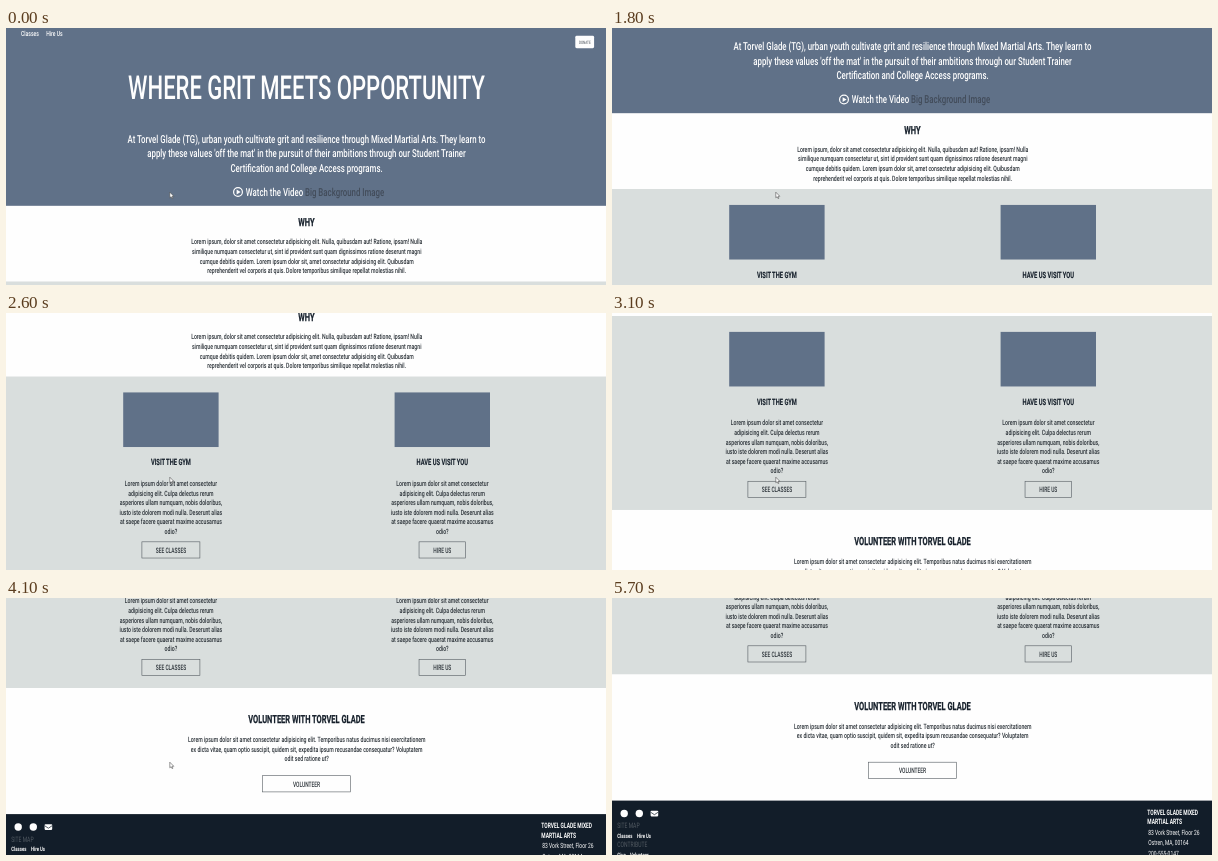
Animation of 600x257 px, one loop 6.1 s. Source, as an HTML page:

```html
<!DOCTYPE html>
<html lang="en">
<head>
<meta charset="utf-8">
<title>Landing page scroll</title>
<style>
html, body { margin: 0; width: 100%; height: 100%; overflow: hidden; background: #fdfdfd; }
svg { display: block; width: 100vw; height: 100vh; }
text { font-family: Roboto, "Liberation Sans", sans-serif; text-rendering: geometricPrecision; white-space: pre; }
</style>
</head>
<body>
<svg id="stage" viewBox="0 0 600 257">
  <g id="page"></g>
  <path id="cursor" d="M0 0V5.6L1.3 4.5L2.2 6.4L3.1 6L2.3 4.1H4Z" fill="#fff" stroke="#444" stroke-width=".55"/>
</svg>
<script>
const NS = "http://www.w3.org/2000/svg";
const page = document.getElementById("page");
const cursor = document.getElementById("cursor");

const BLUE = "#607188", GREY = "#d9dedd", WHITE = "#fefefe", NAVY = "#121d29";
const INK = "#2b3238", DARK = "#151f2a", MUTED = "#535b63";

// Type styles: size, weight, condensing of the face, extra stroke
const STYLES = {
  title: [33, 500, .668],
  hero: [11.05, 500, .71],
  h2: [11.2, 700, .668, .25],
  h3: [8.7, 700, .66, .15],
  body: [7.35, 500, .702],
  button: [7.5, 500, .65],
  nav: [7.1, 500, .71],
  donate: [4.6, 500, .66],
  links: [6, 700, .71],
  label: [7.5, 400, .67],
  org: [7.5, 700, .655],
  address: [7.2, 400, .685]
};

function add(tag, attrs) {
  const el = document.createElementNS(NS, tag);
  for (const key in attrs) el.setAttribute(key, attrs[key]);
  page.appendChild(el);
  return el;
}

function rect(x, y, width, height, fill, extra) {
  add("rect", { x, y, width, height, fill, ...extra });
}

function text(str, x, y, style, fill = INK, anchor = "middle") {
  const [size, weight, narrow, stroke = 0] = STYLES[style];
  add("text", {
    transform: `translate(${x} ${y}) scale(${narrow} 1)`,
    "font-size": size, "font-weight": weight, "text-anchor": anchor,
    fill, stroke: fill, "stroke-width": stroke
  }).textContent = str;
}

const left = (str, x, y, style, fill) => text(str, x, y, style, fill, "start");

function lines(list, x, y, step, style, fill) {
  list.forEach((str, i) => text(str, x, y + i * step, style, fill));
}

function button(label, x, y, w, h) {
  rect(x, y, w, h, "none", { stroke: "#555c62", "stroke-width": .6 });
  text(label, x + w / 2, y + h / 2 + 2.7, "button");
}

function hero() {
  rect(0, 0, 600, 177.9, BLUE);
  left("Classes", 15, 8, "nav", WHITE);
  left("Hire Us", 40.2, 8, "nav", WHITE);
  rect(569.3, 7.8, 18.8, 12.4, WHITE, { rx: 1.4 });
  text("DONATE", 578.8, 15.7, "donate", "#6b7178");
  text("WHERE GRIT MEETS OPPORTUNITY", 300.5, 71.3, "title", WHITE);
  lines([
    "At Torvel Glade (TG), urban youth cultivate grit and resilience through Mixed Martial Arts. They learn to",
    "apply these values 'off the mat' in the pursuit of their ambitions through our Student Trainer",
    "Certification and College Access programs."
  ], 300.5, 114.9, 14.4, "hero", WHITE);
  add("circle", { cx: 232, cy: 164, r: 4.4, fill: "none", stroke: WHITE, "stroke-width": 1.2 });
  add("path", { d: "M230.6 161.6L234.6 164L230.6 166.4Z", fill: WHITE });
  left("Watch the Video", 239.8, 167.6, "hero", WHITE);
  left("Big Background Image", 299, 167.6, "hero", "#424c5a");
}

function why() {
  rect(0, 177.9, 600, 75.6, WHITE);
  text("WHY", 300.5, 198.4, "h2", DARK);
  lines([
    "Lorem ipsum, dolor sit amet consectetur adipisicing elit. Nulla, quibusdam aut! Ratione, ipsam! Nulla",
    "similique numquam consectetur ut, sint id provident sunt quam dignissimos ratione deserunt magni",
    "cumque debitis quidem. Lorem ipsum dolor sit, amet consectetur adipisicing elit. Quibusdam",
    "reprehenderit vel corporis at quis. Dolore temporibus similique repellat molestias nihil."
  ], 300.7, 216.3, 9.62, "body");
}

function card(x, heading, label, w) {
  rect(x - 47.7, 269.4, 95.4, 54.6, BLUE);
  text(heading, x, 342.4, "h3", DARK);
  lines([
    "Lorem ipsum dolor sit amet consectetur",
    "adipisicing elit. Culpa delectus rerum",
    "asperiores ullam numquam, nobis doloribus,",
    "iusto iste dolorem modi nulla. Deserunt alias",
    "at saepe facere quaerat maxime accusamus",
    "odio?"
  ], x, 362.9, 9.6, "body");
  button(label, x - w / 2, 418.8, w, 16.2);
}

function volunteer() {
  rect(0, 447.5, 600, 126.1, WHITE);
  text("VOLUNTEER WITH TORVEL GLADE", 300.5, 482.9, "h2", DARK);
  lines([
    "Lorem ipsum dolor sit amet consectetur adipisicing elit. Temporibus natus ducimus nisi exercitationem",
    "ex dicta vitae, quam optio suscipit, quidem sit, expedita ipsum recusandae consequatur? Voluptatem",
    "odit sed ratione ut?"
  ], 300.7, 501.6, 9.6, "body");
  button("VOLUNTEER", 256.5, 535.2, 88, 16.2);
}

function footer() {
  rect(0, 573.6, 600, 60, NAVY);
  for (const cx of [12.2, 27.3]) add("circle", { cx, cy: 586.5, r: 3.7, fill: WHITE });
  rect(38.6, 583.7, 7.6, 5.7, WHITE, { rx: .8 });
  add("path", { d: "M38.6 585.2L42.4 587.7L46.2 585.2", fill: "none", stroke: NAVY, "stroke-width": .7 });
  left("SITE MAP", 5.3, 601.2, "label", MUTED);
  left("Classes", 5.3, 610.5, "links", WHITE);
  left("Hire Us", 25, 610.5, "links", WHITE);
  left("CONTRIBUTE", 5.3, 620.4, "label", MUTED);
  left("Give", 5.3, 629.8, "links", WHITE);
  left("Volunteer", 18, 629.8, "links", WHITE);
  left("TORVEL GLADE MIXED", 535.3, 587.7, "org", WHITE);
  left("MARTIAL ARTS", 535.3, 597.4, "org", WHITE);
  left("83 Vork Street, Floor 26", 536.3, 607.7, "address", WHITE);
  left("Ostren, MA, 00164", 536.3, 618.4, "address", WHITE);
  left("200-555-0147", 536.3, 629.1, "address", WHITE);
}

hero();
why();
rect(0, 253.5, 600, 194, GREY);
card(164.9, "VISIT THE GYM", "SEE CLASSES", 58);
card(436.3, "HAVE US VISIT YOU", "HIRE US", 46.5);
volunteer();
footer();

const LOOP = 6100, TICK = 100, NOTCH = 32.5, GLIDE = 150, END = 371;
const WHEEL = [1131, 1431, 1709, 1931, 2180, 2509, 2731, 3031, 3331, 3641, 3931, 4331];

// Each wheel notch glides out to a stop; the last one meets the page end
function scrollAt(t) {
  return WHEEL.reduce((sum, start, i) => {
    const dist = Math.min(NOTCH, END - i * NOTCH);
    const u = Math.min(1, Math.max(0, (t - start) / GLIDE));
    return sum + dist * (1 - (1 - u) ** 2);
  }, 0);
}

function draw(now) {
  const t = Math.floor((now % LOOP) / TICK) * TICK;
  page.setAttribute("transform", `translate(0 ${-scrollAt(t)})`);
  const u = Math.min(1, Math.max(0, (t - 5400) / 200)) ** 2;
  cursor.setAttribute("transform", `translate(${163.8 + 85 * u} ${164.2 + 60 * u})`);
  cursor.setAttribute("visibility", t < 5700 ? "visible" : "hidden");
}

const began = performance.now();
function loop() {
  draw(performance.now() - began);
  requestAnimationFrame(loop);
}
loop();
</script>
</body>
</html>
```
